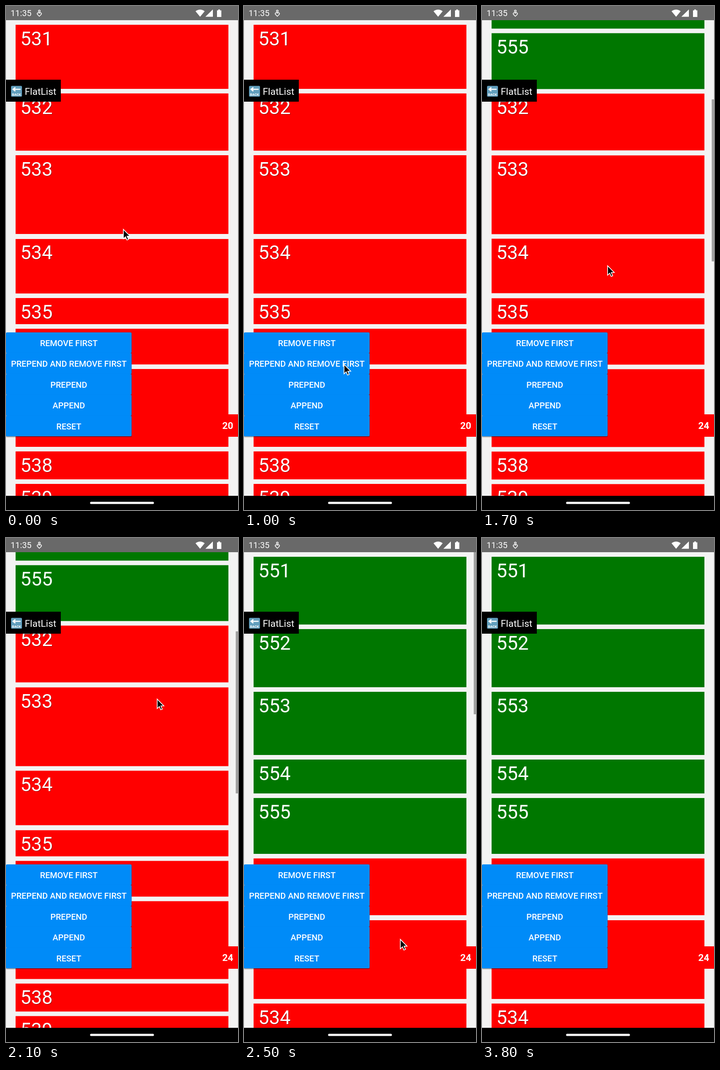
An HTML page that plays this animation: 508x1101 px, repeating every 3900 ms.

```html
<!DOCTYPE html>
<html lang="en">
<head>
<meta charset="utf-8">
<style>
html, body { margin: 0; width: 100%; height: 100%; overflow: hidden; }
body { position: relative; background: #f3f3f3; color: #fff; font-family: Roboto, sans-serif; }
body > * { position: absolute; }
#list { top: 41.3px; left: 20.8px; width: 466.7px; }
.row { box-sizing: border-box; margin-bottom: 10.5px; padding: 5.8px 10.6px; font-size: 42px; line-height: 49px; background: #f00; text-shadow: 1px 1px 1px #0006; }
.new { background: #070; text-shadow: none; }
#bar { right: 0; top: 31px; width: 5.5px; height: 354px; background: #0005; }
#status { top: 0; left: 0; width: 508px; height: 31px; background: #696969; }
#nav { top: 1070px; left: 0; width: 508px; height: 31px; background: #000; }
#nav::after { content: ""; position: absolute; left: 184px; top: 13px; width: 139.5px; height: 5px; border-radius: 3px; background: #eee; }
#back { top: 160.5px; left: 0; width: 120px; height: 48.5px; background: #000; }
#menu { top: 712.5px; left: 0; width: 275px; }
#menu div { position: relative; height: 45.6px; line-height: 47px; border-radius: 2.6px; background: #008bf8; text-align: center; white-space: nowrap; font-size: 18.35px; font-weight: 500; box-shadow: 0 1.5px 2px #0007; }
#ripple { position: absolute; inset: 0; z-index: -1; border-radius: 2.6px; background: radial-gradient(circle at 155px 23px, #0000004d 55%, #0000001f 100%); }
#menu .press { z-index: 0; }
#count { top: 892px; right: 0; width: 45px; height: 48.5px; line-height: 50px; background: #f00; text-align: center; font-size: 21px; font-weight: 700; }
#cursor { left: 0; top: 0; overflow: visible; }
text { font-family: Roboto, sans-serif; fill: #fff; }
</style>
</head>
<body>
<div id="list"></div>
<div id="bar"></div>
<svg id="status" viewBox="0 0 508 31" fill="#fff">
  <text x="10" y="22.3" font-size="18.4">11:35</text>
  <g fill="none" stroke="#fff" stroke-width="1.5">
    <circle cx="73" cy="10.8" r="1.9"/>
    <path d="M73 22.5l-4.2-4.2a2.3 2.3 0 0 1 4.2-2.6a2.3 2.3 0 0 1 4.2 2.6z"/>
  </g>
  <path d="M415 11.5Q425 4 435 11.5L425 23.5zM453 7.5V23.5H436.5zM462 9.5h2.8V7.5h3.6v2H471.5V24H462z"/>
</svg>
<div id="nav"></div>
<svg id="back" viewBox="0 0 120 48.5">
  <rect x="11" y="13.5" width="24" height="23.5" rx="2" fill="#629fbd"/>
  <path d="M32 21H17M20.5 17l-5 4l5 4" fill="none" stroke="#fff" stroke-width="2.6"/>
  <text x="23" y="35" font-size="7.5" font-weight="700" text-anchor="middle">BACK</text>
  <text x="41" y="32.5" font-size="21">FlatList</text>
</svg>
<div id="menu">
  <div>REMOVE FIRST</div>
  <div class="press"><i id="ripple"></i>PREPEND AND REMOVE FIRST</div>
  <div>PREPEND</div>
  <div>APPEND</div>
  <div>RESET</div>
</div>
<div id="count"></div>
<svg id="cursor" width="1" height="1">
  <path d="M0 0V20.5L4.7 16.2L7.8 23.3L11.2 21.8L8.2 14.8H14.6Z" stroke="#fff" stroke-width="1.6"/>
</svg>
<script>
const LOOP = 3900, STEP = 100, PRESS = 1300, PREPENDED = 508.6;
const $ = id => document.getElementById(id);

function addRows(first, heights, kind) {
  heights.forEach((height, i) => {
    const row = document.createElement("div");
    row.className = "row " + kind;
    row.style.height = height + "px";
    row.textContent = first + i;
    $("list").append(row);
  });
}
addRows(551, [147.7, 126.5, 137.5, 73.1, 121.5], "new");
addRows(531, [139.7], "removed");
addRows(532, [124.4, 171.8, 119.1, 56.7, 77.5, 169.5, 60.5, 100], "");

// Each key is [time, value, ...]; values ease between keys.
function track(keys, t) {
  const i = keys.findIndex(key => key[0] > t);
  if (i < 0) return keys.at(-1).slice(1);
  if (!i) return keys[0].slice(1);
  const [from, to] = [keys[i - 1], keys[i]];
  const p = (t - from[0]) / (to[0] - from[0]);
  const eased = p * p * (3 - 2 * p);
  return from.slice(1).map((v, k) => v + (to[k + 1] - v) * eased);
}

const pointer = [[100, 257, 488], [900, 219, 783], [1400, 219, 783], [2000, 331, 352],
  [2100, 331, 352], [2300, 309, 862], [2600, 354, 882], [3200, 354, 882], [3600, 530, 960]];
const scrolling = [[2100, 0], [2300, 429.5], [2400, PREPENDED]];
const barFade = [[2700, 1], [2950, 0]];
const rippleFade = [[1100, 0], [1300, 1], [1600, 0]];

function draw(now) {
  const t = Math.floor(now % LOOP / STEP) * STEP;
  const prepended = t >= PRESS;
  const [scroll] = track(scrolling, t);
  const [x, y] = track(pointer, t);
  document.querySelectorAll(".new").forEach(row => row.hidden = !prepended);
  document.querySelector(".removed").hidden = prepended;
  $("list").style.transform = `translateY(${prepended ? scroll - PREPENDED : 0}px)`;
  $("bar").style.transform = `translateY(${(PREPENDED - scroll) * 0.34}px)`;
  $("bar").style.opacity = prepended ? track(barFade, t)[0] : 0;
  $("ripple").style.opacity = track(rippleFade, t)[0];
  $("count").textContent = prepended ? 24 : 20;
  $("cursor").style.transform = `translate(${x}px, ${y}px)`;
  requestAnimationFrame(() => draw(performance.now()));
}
draw(performance.now());
</script>
</body>
</html>
```
